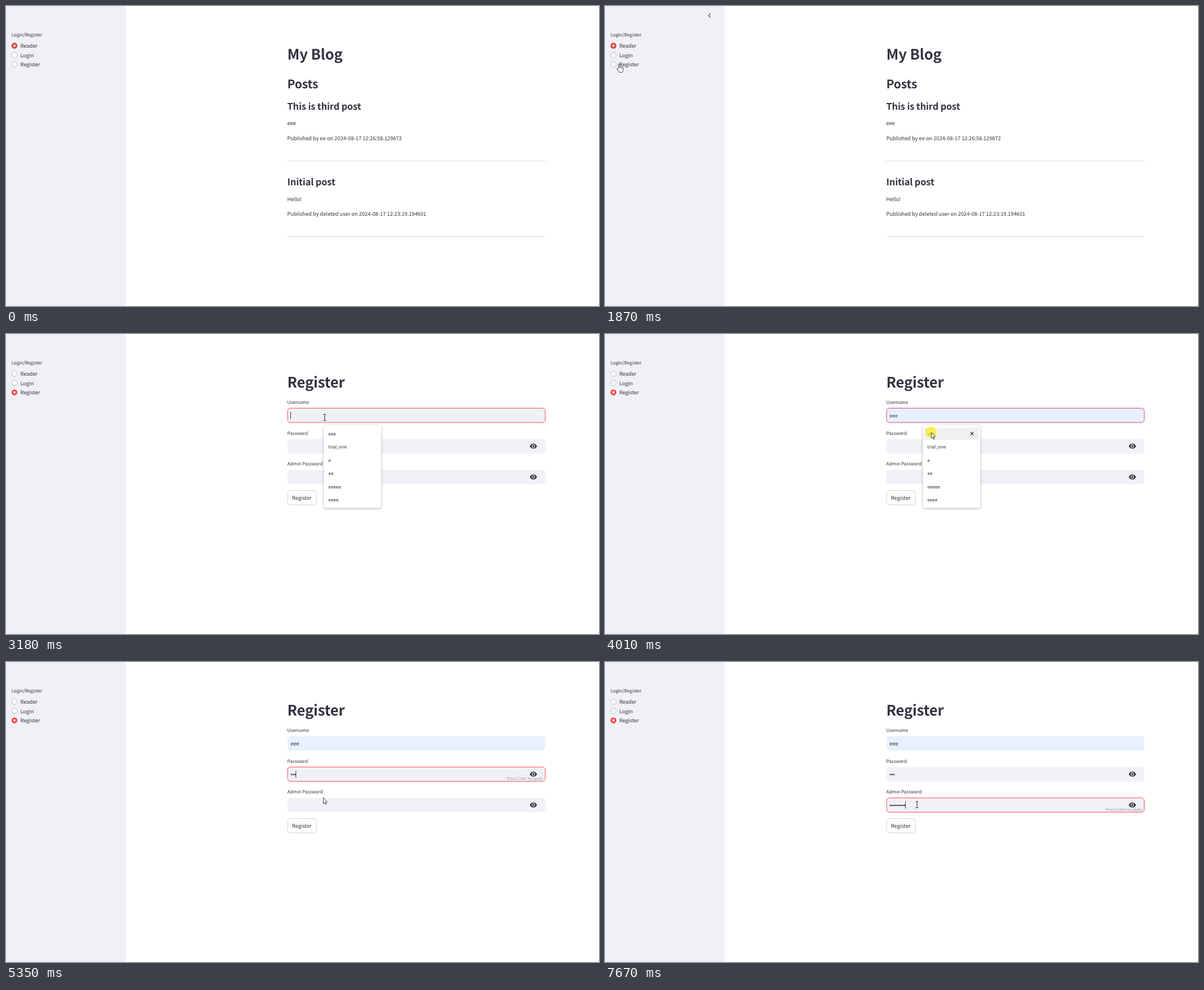
An HTML page for the animation above (8000 ms loop, 1053x532 px).

```html
<!DOCTYPE html>
<html lang="en">
<head>
<meta charset="utf-8">
<title>Blog registration</title>
<style>
  html, body { margin: 0; width: 100%; height: 100%; overflow: hidden; background: #fff; }
  svg { display: block; width: 1053px; height: 532px; }
  text { font-family: "Noto Sans CJK JP", "Noto Sans CJK SC", "Noto Sans CJK", "Noto Sans", sans-serif;
         fill: #31333f; text-rendering: geometricPrecision; }
  .head { letter-spacing: -.005em; }
  .ui { font-family: "Open Sans", "Noto Sans", sans-serif; fill: #202124; }
  .kana { font-feature-settings: "palt"; fill: #444; }
  .menu { filter: drop-shadow(0 1px 2px rgba(0, 0, 0, .3)); }
</style>
</head>
<body>
<svg id="stage" viewBox="0 0 1053 532"></svg>
<script>
const LOOP = 8000, RED = '#ff4b4b', GREY = '#f0f1f6', USER = 'eee';
const stage = document.getElementById('stage');

// Pointer moves: start, end, number of steps, target x, target y
const START = [788, 427];
const MOVES = [
  [240, 380, 3, 622, 369], [580, 730, 3, 207, 215], [930, 1060, 3, 115, 100],
  [1330, 1540, 4, 28, 98], [1740, 1870, 3, 25, 102], [2330, 2400, 2, 467, 190],
  [2590, 2590, 1, 518, 190], [2660, 2810, 3, 566, 148], [3380, 3860, 8, 579, 174],
  [4150, 4350, 4, 563, 187], [5040, 5350, 5, 563, 240], [5410, 5620, 4, 554, 253]
];
const CLICKS = [[2060, 2260], [2890, 3030], [4010, 4080], [4420, 4550], [5750, 5880]];
const KEYS = [[], [4820, 4890, 4960], [6210, 6550, 6750, 6840, 6940, 7210, 7270, 7540, 7670]];
const FIELDS = ['Username', 'Password', 'Admin Password'];
const fieldTop = i => 131.5 + i * 54.7;

const between = (t, a, b) => t >= a && t < b;
const typed = (i, t) => KEYS[i].filter(k => t >= k).length;

// The CJK family's Latin letters are drawn about 1.117 times larger per em
const text = (x, y, size, str, extra = '') =>
  `<text x="${x}" y="${y}" font-size="${size / 1.117}" ${extra}>${str}</text>`;
const heading = (y, size, str, weight = 600) =>
  text(499.5, y, size, str, `class="head" font-weight="${weight}"`);
const uiText = (x, y, size, str) => `<text class="ui" x="${x}" y="${y}" font-size="${size}">${str}</text>`;
const rect = (x, y, w, h, fill, extra = '') =>
  `<rect x="${x}" y="${y}" width="${w}" height="${h}" fill="${fill}" ${extra}/>`;
const circle = (x, y, r, fill, extra = '') => `<circle cx="${x}" cy="${y}" r="${r}" fill="${fill}" ${extra}/>`;
const path = (d, extra) => `<path d="${d}" ${extra}/>`;
const group = (x, y, body, extra = '') => `<g transform="translate(${x} ${y})" ${extra}>${body}</g>`;

function pointerAt(t) {
  let [x, y] = START;
  for (const [from, to, steps, tx, ty] of MOVES) {
    if (t < from) break;
    const gap = steps > 1 ? (to - from) / (steps - 1) : 1;
    const k = Math.min(steps, Math.floor((t - from) / gap + 1e-6) + 1) / steps;
    x += (tx - x) * k;
    y += (ty - y) * k;
  }
  return [x, y];
}

function sidebar(t) {
  const chosen = t < 2200 ? 0 : 2;
  const radios = ['Reader', 'Login', 'Register'].map((name, i) => {
    const y = 70.4 + i * 16.6;
    const dot = i === chosen
      ? circle(15, y, 5.3, chosen ? RED : '#dc4a41') + circle(15, y, 2, '#fff')
      : circle(15, y, 4.9, '#f8f9fb', 'stroke="#b6b7be" stroke-width=".9"');
    return dot + text(25.4, y + 3.6, 10.4, name);
  }).join('');
  const shown = t < 930 ? .5 : 1;
  const chevron = between(t, 730, 2330)
    ? path('M187.3 13.5L183.7 17L187.3 20.5', `fill="none" stroke="#55565f" stroke-width="1.3" opacity="${shown}"`) : '';
  return rect(0, 0, 213, 532, GREY) + text(9.8, 54, 9.1, 'Login/Register') + radios + chevron;
}

function post(y, title, body, byline) {
  return heading(y, 18.2, title) + text(499.5, y + 27.4, 10.4, body) +
    text(499.5, y + 54.2, 10.4, 'Published by ' + byline) + rect(499.5, y + 90.3, 458.5, 1.1, '#dcdce0');
}

const blogPage = () => heading(95, 28.6, 'My Blog', 700) + heading(146, 23.4, 'Posts') +
  post(184, 'This is third post', USER, 'ee on 2024-08-17 12:26:58.129872') +
  post(318.2, 'Initial post', 'Hello!', 'deleted user on 2024-08-17 12:23:19.194601');

const eye = y => group(936.5, y,
  path('M-6.4 0C-4 -5.8 4 -5.8 6.4 0C4 5.8 -4 5.8 -6.4 0Z', 'fill="#31333f"') +
  circle(0, 0, 2.3, 'none', `stroke="${GREY}" stroke-width="1.1"`));

function field(i, t, focus, preview) {
  const y = fieldTop(i), count = typed(i, t), focused = focus === i;
  const filled = i === 0 && (preview || t >= 4080);
  const edge = focused ? `stroke="${preview ? '#d6486c' : RED}"` : '';
  let out = text(499.5, y - 7.6, 9.1, FIELDS[i]) +
    rect(500, y, 457.5, 25.4, filled ? '#e8f0fe' : GREY, `rx="5" ${edge}`);
  if (filled) out += preview ? uiText(505.3, y + 16.6, 8.6, USER) : text(505.3, y + 16.8, 10.4, USER, 'fill="#000"');
  if (i) out += eye(y + 12.7);
  for (let n = 0; n < count; n++) out += circle(506.9 + n * 3.13, y + 13.3, 1.25, '#31333f');
  if (focused && !filled) out += rect(505 + count * 3.13, y + 6.5, .9, 12.5, '#222');
  if (focused && count) out += text(953.6, y + 22.6, 7.8, 'Press Enter to apply',
    'text-anchor="end" style="fill:#9c9da6"');
  return out;
}

function suggestions(hover) {
  const names = [USER, 'trial_one', 'e', 'ee', 'eeeee', 'eeee'];
  return rect(564.5, 162, 102, 146.5, '#fff', 'rx="4" class="menu"') +
    (hover ? rect(567, 166, 96.5, 22, '#f0f0f1', 'rx="1"') +
      path('M649 174L654.4 179.4M654.4 174L649 179.4', 'stroke="#222" stroke-width="1.1"') : '') +
    names.map((name, i) => uiText(572.4, 179.6 + i * 23.55, 8.1, name)).join('');
}

// Password manager hint: opens at once, fades away in steps after the first key
function keyHint(i, t, open) {
  const close = KEYS[i][0];
  const opacity = t < open ? 0 : t < close ? 1 : .62 - .245 * Math.floor((t - close) / 70);
  if (opacity <= 0) return '';
  const y = fieldTop(i) + 30;
  return `<g opacity="${opacity}">` + rect(568.5, y, 212, 30, '#fff', 'rx="4" class="menu"') +
    circle(583, y + 15, 4.5, '#666') +
    text(597, y + 18, 8.15, 'Qelvam アカウントに保存したパスワードとパスキーを使用', 'class="kana"') + '</g>';
}

function registerPage(t, pointerY) {
  const focus = t < 2960 ? -1 : t < 4480 ? 0 : t < 5810 ? 1 : 2;
  const menu = between(t, 3030, 4080), hover = menu && pointerY > 162;
  return heading(95, 28.6, 'Register', 700) +
    FIELDS.map((_, i) => field(i, t, focus, hover)).join('') +
    rect(500, 277.5, 51.3, 25.4, '#fff', 'rx="5" stroke="#d4d4d9"') + text(507.8, 293.7, 10.4, 'Register') +
    (menu ? suggestions(hover) : '') + keyHint(1, t, 4550) + keyHint(2, t, 5880);
}

const OUTLINE = 'fill="#fff" stroke="#222" stroke-width=".85" stroke-linejoin="round"';
const SHAPES = {
  arrow: path('M.4 .5V11L2.8 8.9L4.4 12.6L6 11.9L4.4 8.3H7.5Z', OUTLINE),
  beam: path('M-2.5 -5.5H-.6L0 -5L.6 -5.5H2.5M0 -5V5M-2.5 5.5H-.6L0 5L.6 5.5H2.5',
    'fill="none" stroke="#222" stroke-width="1"'),
  hand: path('M-1.2 9V1.6Q-1.2 .4 0 .4T1.2 1.6V5.8Q2.5 4.8 3.4 6.2Q4.6 5.4 5.4 6.8Q7.2 6.2 7.2 8V11.5' +
    'Q7.2 13.4 6 15.5H0L-3.4 10.2Q-3.6 8.6 -2.4 8.4Z', OUTLINE) +
    path('M1.2 5.8V8.2M3.4 6.2V8.4M5.4 6.8V8.6', 'stroke="#222" stroke-width=".7"')
};

function pointer(t, x, y) {
  if (t < 240) return '';
  const inField = t >= 2590 && FIELDS.some((_, i) => between(y, fieldTop(i), fieldTop(i) + 25.4));
  // The pointer first reaches the password field just below its edge
  const overField = inField && !between(t, 2590, 2700);
  const kind = between(t, 1470, 2330) ? 'hand' : between(t, 380, 580) || overField ? 'beam' : 'arrow';
  const pressed = CLICKS.some(([a, b]) => between(t, a, b));
  return (pressed ? circle(x, y, 10, '#f6ee2c', 'opacity=".78"') : '') + group(x, y, SHAPES[kind]);
}

let shown = '';
function frame() {
  const t = performance.now() % LOOP;
  const [x, y] = pointerAt(t);
  const picture = sidebar(t) + (t < 2260 ? blogPage() : registerPage(t, y)) + pointer(t, x, y);
  if (picture !== shown) stage.innerHTML = shown = picture;
  requestAnimationFrame(frame);
}
frame();
</script>
</body>
</html>
```
